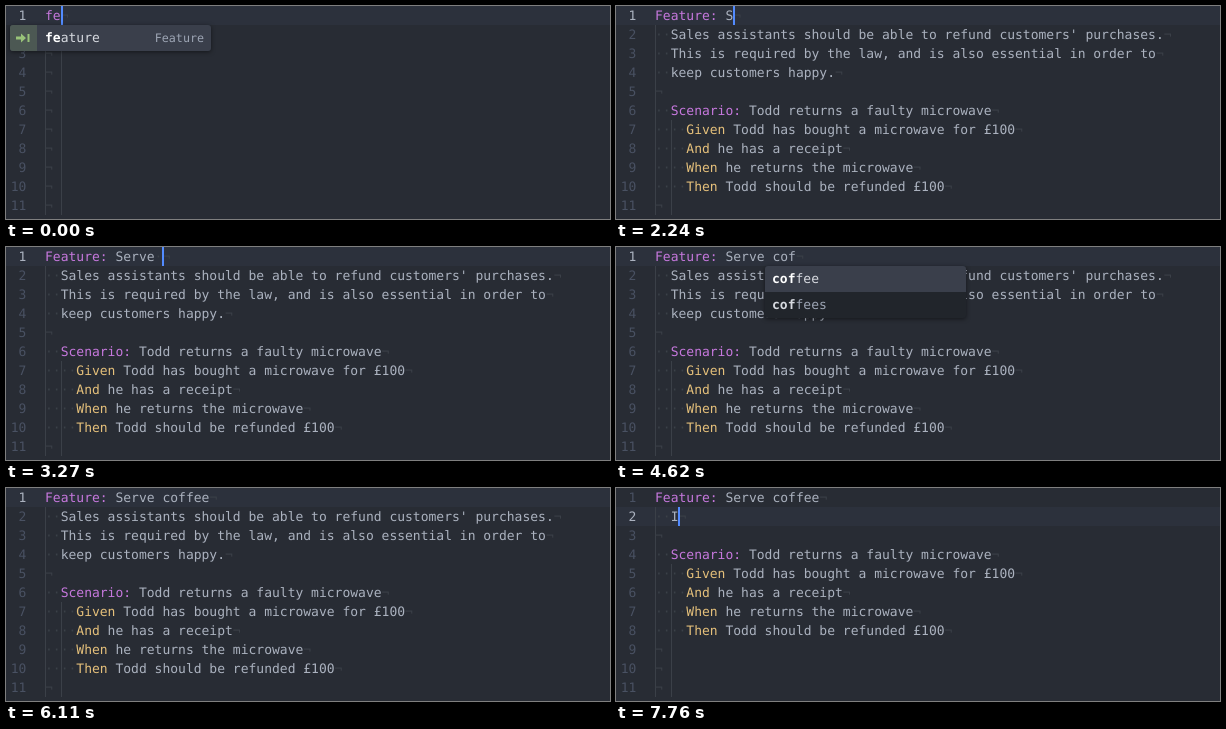
An HTML page that plays this animation: 604 px wide and 213 px high, repeating every 8000 ms.

```html
<!DOCTYPE html>
<html lang="en">
<head>
<meta charset="utf-8">
<title>Editor autocomplete</title>
<style>
  html, body { margin: 0; width: 100%; height: 100%; overflow: hidden; background: #282c34; }
  svg { display: block; }
  text {
    font: 13px "DejaVu Sans Mono", "Liberation Mono", monospace;
    white-space: pre; text-rendering: geometricPrecision; fill: #abb2bf;
  }
  .num { fill: #495162; text-anchor: end; }
  .num.on { fill: #abb2bf; }
  .faint { fill: #3b4048; }
  .guide { fill: #3b4048; }
  .title { fill: #c678dd; }
  .step { fill: #e5c07b; }
  .line { fill: #2c313c; }
  .sel { fill: #3e4451; }
  .caret { fill: #528bff; }
  .panel { fill: #21252b; filter: drop-shadow(0 1px 2px rgba(0, 0, 0, .5)); }
  .row { fill: #3a3f4b; }
  .word { fill: #9da5b4; }
  .word.on { fill: #d7dae0; }
  .hit { font-weight: bold; fill: #d7dae0; }
  .on .hit { fill: #fff; }
  .hint { font-size: 11.7px; fill: #9da5b4; text-anchor: end; }
  .badge { fill: #4c5853; }
  .icon { fill: #98c379; }
</style>
</head>
<body>
<svg id="stage" width="604" height="213" viewBox="0 0 604 213"></svg>
<script>
(() => {
const LOOP = 8000, WIDTH = 604, ROW = 19, ROWS = 11, LEFT = 39, CHAR = 7.8265;
const POP_WIDTH = 201, POP_ROW = 26;
const stage = document.getElementById('stage');

const story = [
  "  Sales assistants should be able to refund customers' purchases.",
  '  This is required by the law, and is also essential in order to',
  '  keep customers happy.'
];
const scenario = [
  '',
  '  Scenario: Todd returns a faulty microwave',
  '    Given Todd has bought a microwave for £100',
  '    And he has a receipt',
  '    When he returns the microwave',
  '    Then Todd should be refunded £100'
];

const snippet = (col, typed, word, hint, more = []) =>
  ({ col, typed, hint, words: [word, ...more] });
const words = (col, typed, ...list) => ({ col, typed, words: list });
const scene = (typed, more) => snippet(9, typed, 'scenario', 'Scenario', more);
const coffee = typed => words(15, typed, 'coffee', 'coffees');
const title = text => ({ head: 'Feature: ' + text, caret: true });

// Each step changes part of the state and leaves the rest as it was.
const steps = [
  [0, { head: 'fe', body: [], active: 1, caret: true, sel: [], pop: snippet(0, 'fe', 'feature', 'Feature') }],
  [450, { caret: false }],
  [590, { head: 'Feature: Refund item', body: [...story, ...scenario], sel: [[1, 9, 20]], pop: null }],
  [2240, { ...title('S'), sel: [] }],
  [2390, { pop: scene('s') }],
  [2540, { ...title('Se'), pop: scene('se') }],
  [2690, title('Ser')],
  [2840, { pop: scene('ser', ['serve', 'server', 'series']) }],
  [2980, title('Serv')],
  [3130, { ...title('Serve'), pop: words(9, 'serve', 'serve', 'server') }],
  [3270, { ...title('Serve '), pop: null }],
  [3570, title('Serve c')],
  [3870, title('Serve co')],
  [4020, title('Serve cof')],
  [4170, { pop: coffee('cof') }],
  [4620, { caret: false }],
  [4920, { ...title('Serve coff'), pop: coffee('coff') }],
  [5070, { ...title('Serve coffe'), pop: coffee('coffe') }],
  [5220, title('Serve coffee')],
  [5360, { pop: coffee('coffee') }],
  [5510, { pop: null }],
  [6110, { caret: false }],
  [6410, { active: 0, sel: [[2, 2, 99], [3, 0, 99], [4, 0, 23]] }],
  [7760, { body: ['  I', ...scenario], active: 2, caret: true, sel: [] }]
];

const colX = col => LEFT + col * CHAR;
const rowY = row => (row - 1) * ROW;
const span = (name, s) => s ? `<tspan class="${name}">${s}</tspan>` : '';
const rect = (name, x, y, w, h) =>
  `<rect class="${name}" x="${x}" y="${y}" width="${w}" height="${h}"/>`;
const text = (name, x, y, s) => `<text class="${name}" x="${x}" y="${y}">${s}</text>`;
const dots = s => span('faint', '·'.repeat(s.length));

function markup(line) {
  const [, lead, head, step, rest, tail] =
    line.match(/^( *)(Feature:|Scenario:|fe$)?(Given|And|When|Then)?(.*?)( *)$/);
  return dots(lead) + span('title', head) + span('step', step) + rest + dots(tail) + span('faint', '¬');
}

// Marks the typed letters, in order, inside a suggestion.
function marked(word, typed) {
  let next = 0;
  return [...word].map(c => c === typed[next] ? (next++, span('hit', c)) : c).join('')
    .replace(/<\/tspan><tspan class="hit">/g, '');
}

function popup({ col, typed, hint, words }) {
  const pad = hint ? 35 : 7;
  const height = words.length * POP_ROW;
  let inner = rect('row', 0, 0, POP_WIDTH, POP_ROW);
  if (hint) {
    inner += rect('badge', 0, 0, 27, POP_ROW)
      + '<path class="icon" d="M6 11.5h5v-3l5 4.5-5 4.5v-3H6zM17.5 9h2v8h-2z"/>'
      + text('hint', 194, 17, hint);
  }
  words.forEach((word, i) => {
    inner += text(i ? 'word' : 'word on', pad, 17 + i * POP_ROW, marked(word, typed));
  });
  const box = `width="${POP_WIDTH}" height="${height}" rx="3"`;
  return `<g transform="translate(${Math.floor(colX(col)) - pad} ${ROW})">
    <clipPath id="round"><rect ${box}/></clipPath>
    <rect class="panel" ${box}/><g clip-path="url(#round)">${inner}</g></g>`;
}

function draw({ head, body, active, caret, sel, pop }) {
  const lines = [head, ...body];
  const nested = lines.findIndex(l => l.includes('Scenario:')) + 1;
  let out = active ? rect('line', LEFT, rowY(active), WIDTH - LEFT, ROW) : '';

  for (const [row, from, to] of sel) {
    const end = Math.min(colX(to), WIDTH);
    out += rect('sel', colX(from), rowY(row), end - colX(from), ROW);
  }
  for (let row = 1; row <= ROWS; row++) {
    const y = rowY(row), base = y + 14;
    const lit = row === active || sel.some(s => s[0] === row);
    if (lit) out += rect('line', 0, y, LEFT, ROW);
    if (row > 1) out += rect('guide', LEFT, y, 1, ROW);
    if (row > Math.max(nested, 1)) out += rect('guide', 55, y, 1, ROW);
    out += text(lit ? 'num on' : 'num', 20.4, base, row);
    out += text('', LEFT, base, markup(lines[row - 1] || ''));
  }
  if (caret && active) {
    out += rect('caret', Math.round(colX(lines[active - 1].length)), rowY(active), 2, ROW);
  }
  stage.innerHTML = out + (pop ? popup(pop) : '');
}

let shown = -1;
function tick() {
  const t = performance.now() % LOOP;
  const past = steps.filter(([at]) => at <= t);
  if (past.length !== shown) {
    shown = past.length;
    draw(Object.assign({}, ...past.map(([, change]) => change)));
  }
  requestAnimationFrame(tick);
}
tick();
})();
</script>
</body>
</html>
```
